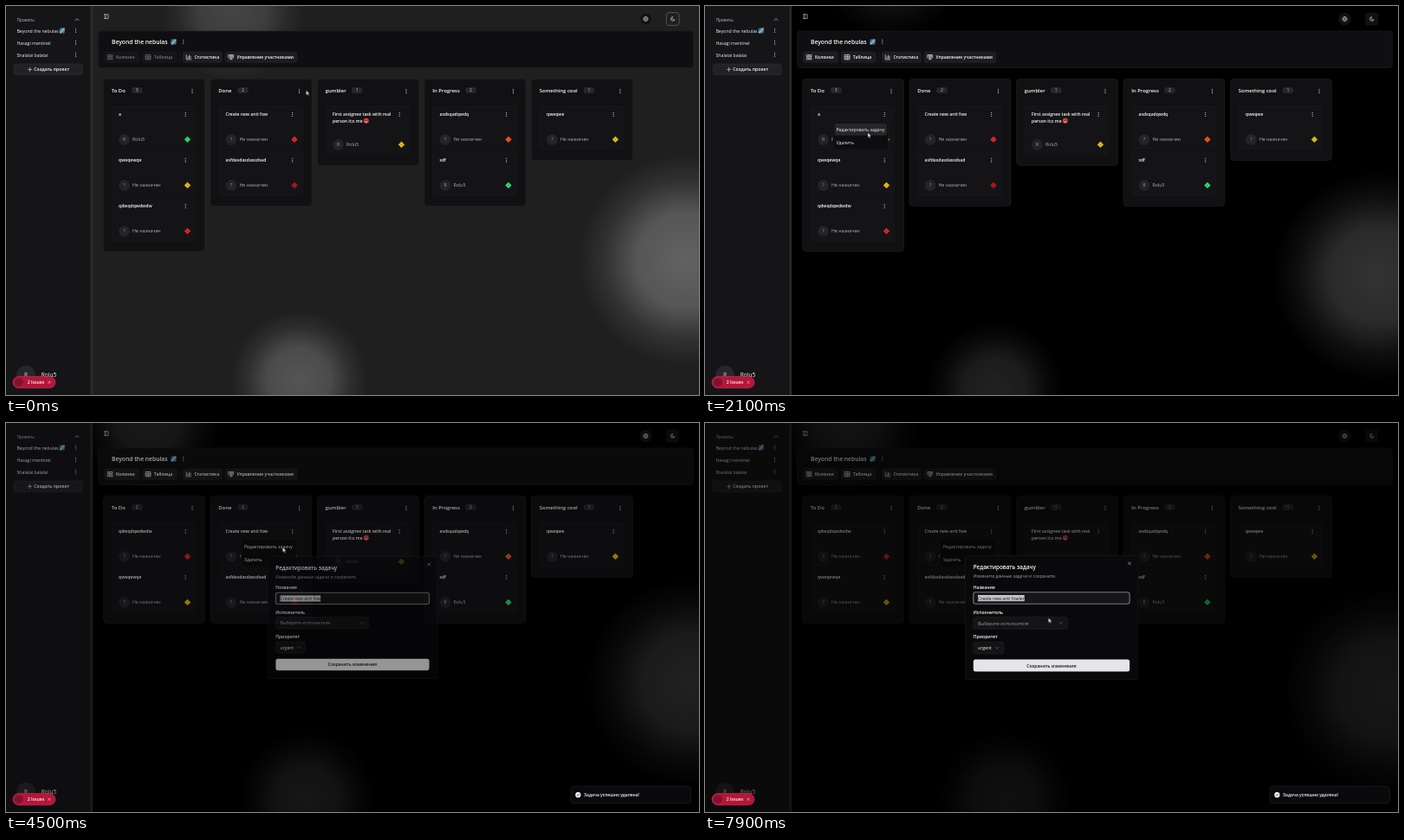
Write an HTML page that moves like this. It is 800 by 450 pixels and loops after 8 s.

```html
<!DOCTYPE html>
<html lang="ru">
<head>
<meta charset="utf-8">
<title>Board</title>
<style>
html, body { margin: 0; width: 100%; height: 100%; overflow: hidden; background: #000; }
svg { display: block; width: 800px; height: 450px; font-family: "Open Sans", "Noto Sans", sans-serif; }
text { white-space: pre; }
.page { animation: page 8s linear infinite; }
.right { animation: right 8s linear infinite; }
.low { animation: low 8s linear infinite; }
.top { animation: top 8s linear infinite; }
.tabs { animation: tabs 8s linear infinite; }
.ring { animation: ring 8s linear infinite; }
.toast { animation: toast 8s ease-out infinite; }
.shade { animation: shade 8s linear infinite; }
.modal { transform-origin: 400px 225px; animation: modal 8s linear infinite; }
.cursor { animation: cursor 8s ease-in-out infinite; }
@keyframes page { 0% { fill: #1f1f20; } 1.25% { fill: #090909; } 4%, 100% { fill: #000; } }
@keyframes right {
  0%, 1.25% { transform: translate(783px, 294px); opacity: .3; }
  10% { opacity: .22; }
  26.25% { transform: translate(776px, 312px); opacity: .2; }
  41.25% { transform: translate(789px, 288px); opacity: .2; }
  56.25% { transform: translate(790px, 300px); opacity: .19; }
  100% { transform: translate(786px, 310px); opacity: .19; }
}
@keyframes low {
  0%, 1.25% { transform: translate(338px, 432px); opacity: .24; }
  10% { opacity: .15; }
  26.25% { transform: translate(335px, 443px); opacity: .13; }
  41.25% { transform: translate(346px, 430px); opacity: .13; }
  56.25% { transform: translate(347px, 434px); opacity: .13; }
  100% { transform: translate(346px, 434px); opacity: .13; }
}
@keyframes top {
  0%, 1.25% { transform: translate(262px, 4px); opacity: .17; }
  10% { opacity: .1; }
  26.25% { transform: translate(215px, -45px); opacity: .1; }
  41.25% { transform: translate(165px, -4px); opacity: .15; }
  100% { transform: translate(165px, -4px); opacity: .15; }
}
@keyframes tabs { 0%, 3% { opacity: .45; } 10%, 100% { opacity: 1; } }
@keyframes ring { 0%, 12.5% { opacity: 1; } 16%, 100% { opacity: 0; } }
@keyframes toast {
  0%, 36.25% { transform: translateY(30px); opacity: 0; }
  40%, 100% { transform: none; opacity: 1; }
}
@keyframes shade { 0%, 55% { opacity: 0; } 57%, 100% { opacity: .52; } }
@keyframes modal {
  0%, 55% { opacity: 0; transform: scale(.95); }
  56.25% { opacity: .65; transform: scale(.982); }
  57.5%, 100% { opacity: 1; transform: none; }
}
@keyframes cursor {
  0% { transform: translate(346.5px, 97.5px); }
  1.25% { transform: translate(301.5px, 130px); }
  11%, 19% { transform: translate(207px, 126px); }
  26.25% { transform: translate(188px, 146.5px); }
  31%, 35% { transform: translate(165px, 157px); }
  41.25% { transform: translate(360.5px, 143.5px); }
  47.5%, 50.5% { transform: translate(331px, 126px); }
  54%, 57% { transform: translate(319.5px, 144px); }
  63.5%, 93.5% { transform: translate(380px, 200.5px); }
  98.5%, 100% { transform: translate(396.5px, 225.5px); }
}
</style>
</head>
<body>
<svg id="stage" viewBox="0 0 800 450">
  <defs>
    <radialGradient id="glow">
      <stop offset="0" stop-color="#fff"/>
      <stop offset=".45" stop-color="#fff" stop-opacity=".82"/>
      <stop offset=".75" stop-color="#fff" stop-opacity=".28"/>
      <stop offset="1" stop-color="#fff" stop-opacity="0"/>
    </radialGradient>
    <linearGradient id="sky" x2="1" y2="1">
      <stop offset="0" stop-color="#16324a"/>
      <stop offset=".5" stop-color="#6fa5bd"/>
      <stop offset="1" stop-color="#14273f"/>
    </linearGradient>
  </defs>
</svg>
<script>
const stage = document.getElementById('stage');
const USER = 'Rolu5', BOARD = 'Beyond the nebulas', NOBODY = 'Не назначен';
const RED = '#e0262b', CRIMSON = '#b8151c', YELLOW = '#edbd10', GREEN = '#2bdc6c', ORANGE = '#f2531d';
let css = '', count = 0;

const rect = (x, y, w, h, r, fill, stroke = 'none', sw = .5) =>
  `<rect x="${x}" y="${y}" width="${w}" height="${h}" rx="${r}" fill="${fill}" stroke="${stroke}" stroke-width="${sw}"/>`;
const disc = (x, y, r, fill, stroke = 'none') =>
  `<circle cx="${x}" cy="${y}" r="${r}" fill="${fill}" stroke="${stroke}" stroke-width=".5"/>`;
const line = (d, stroke = '#e4e4e7', w = .6) =>
  `<path d="${d}" fill="none" stroke="${stroke}" stroke-width="${w}" stroke-linecap="round" stroke-linejoin="round"/>`;
const text = (x, y, s, size = 5.15, fill = '#f4f4f5', weight = 400, anchor = 'start') =>
  `<text x="${x}" y="${y}" font-size="${size}" fill="${fill}" font-weight="${weight}" text-anchor="${anchor}">${s}</text>`;
const bold = (x, y, s, size = 5.05, fill = '#fafafa', anchor) => text(x, y, s, size, fill, 600, anchor);
const dots = (x, y) => [-2, 0, 2].map(d => disc(x, y + d, .55, '#e4e4e7')).join('');
const cross = (x, y, r, c) => line(`M${x - r} ${y - r}l${2 * r} ${2 * r}m0 ${-2 * r}l${-2 * r} ${2 * r}`, c);
const group = (cls, body) => `<g class="${cls}">${body}</g>`;
const glow = (cls, r) => `<circle class="${cls}" r="${r}" fill="url(#glow)"/>`;

// Visible only from a to b milliseconds of the loop
function during(a, b, body) {
  const name = 'v' + count++;
  css += `@keyframes ${name}{0%{visibility:hidden}${a / 80}%{visibility:visible}${b / 80}%{visibility:hidden}}`;
  return `<g style="animation:${name} 8s step-end infinite">${body}</g>`;
}

const galaxy = (x, y) => rect(x - 3.2, y - 3.2, 6.4, 6.4, 1, 'url(#sky)') +
  line(`M${x - 1.8} ${y + 2.2}l3.6 -4.4`, '#c3dce6', .7) + disc(x + 1.9, y + 1.4, .4, '#fff');
const hotFace = (x, y) => disc(x, y, 3, '#d8433f') + disc(x - 1, y - .6, .5, '#3a1212') +
  disc(x + 1, y - .6, .5, '#3a1212') + line(`M${x - .9} ${y + 1.3}h1.8`, '#f7d7d0', .8);

function card(x, y, title, color, owner) {
  const rows = title.split('\n'), extra = (rows.length - 1) * 6;
  const cy = y + 39 + extra;
  return rect(x + 9.5, y, 97, 50.5 + extra, 2.5, '#141417', '#1a1a1d') +
    rows.map((s, i) => bold(x + 17.5, y + 11.7 + i * 7.6, s)).join('') + dots(x + 94.7, y + 10) +
    disc(x + 24, cy, 6.3, '#242428') +
    text(x + 24, cy + 1.8, owner ? USER[0] : '?', 5, '#a1a1aa', 400, 'middle') +
    text(x + 33.5, cy + 1.9, owner ? USER : NOBODY, 5.25, '#b4b4bb') +
    `<path d="M${x + 97} ${cy - 3.5}l3.4 3.4l-3.4 3.4l-3.4 -3.4z" fill="${color}" stroke="${color}" stroke-width=".5" stroke-linejoin="round"/>` +
    disc(x + 97, cy - .1, .7, '#0005');
}

function column(i, title, pillX, bottom, cards) {
  const x = 112.5 + i * 123.5;
  return rect(x, 84.5, 117, bottom - 84.5, 4, '#111113', '#242427') +
    bold(x + 9.3, 99.8, title, 5.9) + rect(pillX, 94, 12.6, 7, 3, '#27272a') +
    text(pillX + 6.3, 99.2, cards.length, 4.4, '#d4d4d8', 400, 'middle') + dots(x + 102.5, 98.6) +
    cards.map((c, k) => card(x, 115.5 + k * 53, ...c)).join('');
}

const hover = x => rect(x + 1.5, 135.8, 60.5, 14, 2, '#27272a');
const menu = (x, lit) => rect(x, 134, 63.5, 32, 3, '#0d0d0f', '#1f1f22') + lit +
  text(x + 3.5, 144.8, 'Редактировать задачу') + text(x + 3.5, 160, 'Удалить');

function sidebar() {
  const items = [BOARD, 'Hasagi mentinel', 'Shalalai balalai'];
  return rect(0, 0, 98, 450, 0, '#151518') + rect(97.5, 0, 2.5, 450, 0, '#2b2b2e') +
    text(12.7, 17.6, 'Проекты', 4.7, '#c4c4ca') + line('M80 16.6l2 -2l2 2') +
    items.map((s, i) => text(12.5, 30.7 + i * 14, s, 5.2) + dots(80.5, 28.3 + i * 14)).join('') + galaxy(64.8, 28.5) +
    rect(9, 67, 79.5, 12.7, 3, '#222225', '#303034') + line('M25.5 73.4h4.2m-2.1 -2.1v4.2') +
    bold(32.3, 75.4, 'Создать проект', 5.2) +
    disc(23, 427, 11, '#27272a') + text(23, 429.4, USER[0], 6.6, '#d4d4d8', 400, 'middle') +
    text(40.7, 429.4, USER, 6.6);
}

function button(x, w, label, icon) {
  return rect(x, 53, w, 12.5, 2.5, '#1d1d20', '#242428') +
    `<g transform="translate(${x + 4.2} 56.5)">${line(icon, '#e4e4e7', .7)}</g>` + bold(x + 13.4, 61.2, label, 5);
}

function header() {
  const grid = 'M0 0h2v2h-2zM3.3 0h2v2h-2zM0 3.3h2v2h-2zM3.3 3.3h2v2h-2z';
  const table = 'M0 0h5.4v5.4h-5.4zM0 2h5.4M0 3.7h5.4M2.7 0v5.4';
  const chart = 'M0 0v5.4h5.4M1.8 4v-1.6M3.3 4v-3.4M4.8 4v-2.4';
  const board = 'M0 0h5.4v3.4h-5.4zM1.2 1.2h3M1.2 2.2h3M2.7 3.4v1.8M1.4 5.2h2.6';
  return line('M113.3 9.8h4.8v4.6h-4.8zM115 9.8v4.6') +
    disc(738.5, 15, 6.6, '#111113', '#29292c') + disc(738.5, 15, 2.6, 'none', '#fff') +
    line('M736 15h5M738.5 12.4q-2.2 2.6 0 5.2q2.2 -2.6 0 -5.2', '#e4e4e7', .45) +
    rect(762.3, 7.5, 14.8, 15, 3, '#111113') +
    group('ring', rect(762.3, 7.5, 14.8, 15, 3, '#202023', '#6b6b70', .7)) +
    line('M769.4 12.7a2.3 2.3 0 1 0 2.6 2.8a1.9 1.9 0 0 1 -2.6 -2.8') +
    rect(106.5, 29, 687, 42.5, 4, '#0f0f11', '#222225') +
    bold(122, 44, BOARD, 6.75) + galaxy(193.5, 41.5) + dots(204.8, 41.3) +
    group('tabs', button(113.5, 40.5, 'Колонки', grid) + button(157.3, 40, 'Таблица', table)) +
    line('M200.5 53.5v11.5', '#242428', .5) +
    button(204, 45.5, 'Статистика', chart) + button(253, 83, 'Управление участниками', board);
}

const cardA = ['a', GREEN, 1], cardB = ['qweqewqe', YELLOW], cardC = ['qdwqdqwdwdw', RED];
const columns = during(0, 2800, column(0, 'To Do', 145, 284, [cardA, cardB, cardC])) +
  during(2800, 8000, column(0, 'To Do', 145, 231.5, [cardC, cardB])) +
  column(1, 'Done', 267.2, 231.5, [['Create new anti fow', RED], ['asfdasdasdassdsad', CRIMSON]]) +
  column(2, 'gumbler', 399, 184.5, [['First assignee task with real\nperson it;s me', YELLOW, 1]]) + hotFace(415.8, 132.8) +
  column(3, 'In Progress', 530.3, 231.5, [['asdsqadqwdq', ORANGE], ['sdf', GREEN, 1]]) +
  column(4, 'Something cool', 666.7, 178.5, [['qweqwe', '#dcc417']]);

const menus = during(1500, 2700, menu(148, during(1900, 2350, hover(148)))) +
  during(4000, 8000, menu(271.5, during(4150, 4400, hover(271.5))));

// Each state of the name field: text, start, end, mark ('sel', 'caret' or none)
function field() {
  const base = 'Create new anti fow';
  const probe = document.createElementNS(stage.namespaceURI, 'text');
  probe.setAttribute('font-size', 5.15);
  stage.append(probe);
  const states = [
    [base, 4400, 5300, 'sel'], [base, 5300, 5850, 'caret'], [base, 5850, 6000],
    [base + 'l', 6000, 6250, 'caret'], [base + 'le', 6250, 6500, 'caret'],
    [base + 'ler', 6500, 6900, 'caret'], [base + 'ler', 6900, 7400], [base + 'ler', 7400, 8000, 'sel']
  ];
  const out = states.map(([s, a, b, mark]) => {
    probe.textContent = s;
    const w = probe.getComputedTextLength(), sel = mark === 'sel';
    return during(a, b, (sel ? rect(315, 199, w, 7.2, 0, '#c4c4c6') : '') +
      text(315, 204.7, s, 5.15, sel ? '#18181b' : '#fafafa') +
      (mark === 'caret' ? rect(315.2 + w, 199.3, .5, 6.6, 0, '#fff') : ''));
  }).join('');
  probe.remove();
  return out;
}

const modal = () => rect(300.3, 153.2, 199.4, 143.6, 3, '#09090b', '#252528') +
  bold(309.7, 168.8, 'Редактировать задачу', 6.35) +
  text(309.7, 179, 'Измените данные задачи и сохраните.', 5.05, '#a1a1aa') + cross(490, 162.4, 1.5, '#c4c4c8') +
  bold(309.7, 191.8, 'Название', 5.1) + rect(309.8, 195.8, 180.4, 13.4, 2.5, '#161618', '#77777c', 1.1) + field() +
  bold(309.7, 220.6, 'Исполнитель', 5.1) + rect(309.8, 224.6, 109, 13.6, 2.5, '#141416', '#29292c') +
  text(315, 233.5, 'Выберите исполнителя', 5.15, '#9a9aa1') + line('M409.3 230.7l1.6 1.6l1.6 -1.6', '#77777c') +
  bold(309.7, 249.4, 'Приоритет', 5.1) + rect(309.8, 253.4, 35, 13.4, 2.5, '#141416', '#29292c') +
  text(315, 262.2, 'urgent') + line('M335.7 259.5l1.6 1.6l1.6 -1.6', '#77777c') +
  rect(309.8, 273.6, 180.4, 13.8, 2.5, '#e5e5e7') + bold(400, 282.5, 'Сохранить изменения', 5.05, '#18181b', 'middle');

const badge = rect(8, 428.5, 49, 13.6, 6.8, '#b3173a', '#d4365a') + disc(14.8, 435.3, 4.9, '#7d1230') +
  bold(24.8, 437.1, '2 Issues', 5.1) + cross(50, 435.3, 1.3, '#f4c6d0');
const toast = rect(652, 420.2, 138.5, 20, 3, '#0a0a0c', '#29292c') + disc(660.4, 430.2, 3.1, '#fafafa') +
  line('M659 430.3l1 1l1.8 -2', '#111', .7) + bold(667, 432.1, 'Задача успешно удалена!', 4.95);

const shape = (d, fill = '#fff') =>
  `<path d="${d}" fill="${fill}" stroke="#111" stroke-width=".4" stroke-linejoin="round"/>`;
const arrow = shape('M0 0v5.4l1.3 -1.1l.9 2l.9 -.4l-.9 -1.9h1.6z');
const hand = shape('M-.6 .2q.6 -.6 1.2 0v2.3l2.4 .6q.6 .2 .5 .9l-.5 2.6h-3.2l-2 -2.7q.4 -.8 1.6 .2z');
const beam = line('M-1.2 -3.4h2.4M0 -3.4v6.8M-1.2 3.4h2.4', '#e8e8e8', .6);
const cursor = [[0, 100, arrow], [100, 1500, hand], [1500, 3200, arrow], [3200, 3450, arrow], [3450, 4050, hand],
  [4050, 4800, arrow], [4800, 7550, beam], [7550, 8000, arrow]].map(c => during(...c)).join('');

stage.insertAdjacentHTML('beforeend',
  '<rect class="page" width="800" height="450"/>' + glow('right', 122) + glow('low', 80) + glow('top', 85) +
  header() + columns + sidebar() + menus +
  '<rect class="shade" width="800" height="450"/>' +
  group('modal', modal()) + group('toast', toast) + badge + group('cursor', cursor));
document.head.insertAdjacentHTML('beforeend', `<style>${css}</style>`);
</script>
</body>
</html>
```
